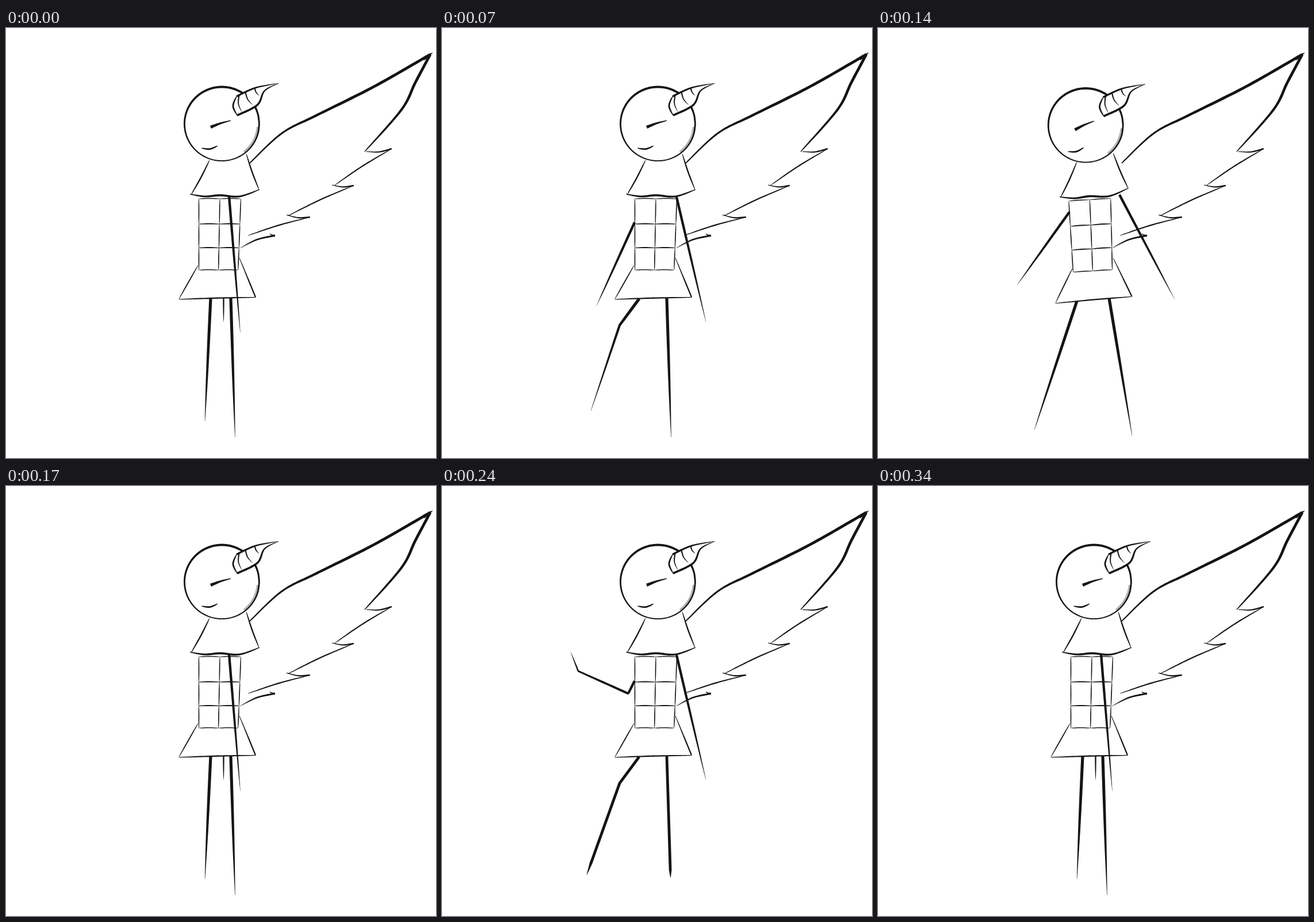
These frames come from a looping animation (748 by 748 pixels, 370 ms). An HTML page with a canvas:

```html
<!DOCTYPE html>
<html lang="en">
<head>
<meta charset="utf-8">
<title>Winged stick figure</title>
<style>
html, body { margin: 0; width: 100%; height: 100%; overflow: hidden; background: #fff; }
canvas { display: block; width: 748px; height: 748px; }
</style>
</head>
<body>
<canvas id="stage" width="748" height="748"></canvas>
<script>
const ctx = document.getElementById('stage').getContext('2d');
const INK = '#141414';
const TAU = 2 * Math.PI;

// Pen pressure along a stroke, u from 0 to 1.
const both = u => 0.25 + 0.75 * Math.sin(Math.PI * u) ** 0.7;
const tail = u => 1.08 - u ** 2.4;
const blunt = u => Math.min(1, 0.15 + 14 * (1 - u));
const grow = u => 0.4 + 0.6 * Math.min(1, 1.6 * u);

const lerp = (a, b, t) => a + (b - a) * t;
const mix = (p, q, t) => p.map((v, i) => lerp(v, q[i], t));
const spline = (a, b, c, d, t) => 0.5 * (2 * b + (c - a) * t +
  (2 * a - 5 * b + 4 * c - d) * t * t + (3 * b - a - 3 * c + d) * t * t * t);

// Point at u on a smooth curve or a polyline through points.
function along(points, u, smooth = true) {
  const n = points.length - 1;
  const i = Math.min(n - 1, Math.floor(u * n));
  const t = u * n - i;
  if (!smooth) return mix(points[i], points[i + 1], t);
  const at = k => points[Math.max(0, Math.min(n, k))];
  return [0, 1].map(c => spline(at(i - 1)[c], at(i)[c], at(i + 1)[c], at(i + 2)[c], t));
}

function brush(points, width, press = both, smooth = true) {
  const steps = 16 * (points.length - 1);
  const left = [], right = [];
  for (let s = 0; s <= steps; s++) {
    const u = s / steps;
    const [x, y] = along(points, u, smooth);
    const [ax, ay] = along(points, Math.max(0, u - 0.01), smooth);
    const [bx, by] = along(points, Math.min(1, u + 0.01), smooth);
    const k = width * press(u) / 2 / Math.hypot(bx - ax, by - ay);
    const nx = (ay - by) * k, ny = (bx - ax) * k;
    left.push([x + nx, y + ny]);
    right.unshift([x - nx, y - ny]);
  }
  ctx.fillStyle = INK;
  ctx.beginPath();
  for (const p of left.concat(right)) ctx.lineTo(...p);
  ctx.fill();
}

// Stroke between two points, its middle pushed sideways by bow.
function arc(p, q, bow, width, press) {
  const [dx, dy] = [q[0] - p[0], q[1] - p[1]];
  const k = bow / Math.hypot(dx, dy);
  const [mx, my] = mix(p, q, 0.5);
  brush([p, [mx - dy * k, my + dx * k], q], width, press);
}

const limb = (width, press, ...joints) => brush(joints, width, press, false);

// Draws a part turned about a pivot and shifted.
function part([cx, cy], dx, dy, degrees, draw) {
  ctx.save();
  ctx.translate(cx + dx, cy + dy);
  ctx.rotate(degrees * Math.PI / 180);
  ctx.translate(-cx, -cy);
  draw();
  ctx.restore();
}

function feather(hook, tip, end) {
  arc(hook, tip, 3, 2.4, grow);
  arc(tip, end, 2, 2.2);
}

function wing() {
  const tip = [738, 46];
  brush([[424, 235], [480, 183], [540, 152], [640, 102], tip], 4.8, grow);
  limb(5, tail, [726, 54], [742, 43]);
  brush([tip, [712, 95], [688, 142], [624, 215]], 4.8, u => 1 - 0.75 * u ** 4);
  feather([627, 215], [671, 210], [571, 274]);
  feather([567, 273], [605, 274], [490, 327]);
  feather([488, 325], [529, 329], [421, 361]);
  arc([459, 358], [468, 361], 1, 2.4, grow);
  arc([468, 361], [407, 383], 4, 2.8, tail);
}

const HEAD = [375.5, 166.8];

function head() {
  const [x, y] = HEAD;
  ctx.strokeStyle = 'rgba(100,100,100,.5)';
  ctx.lineWidth = 3.5;
  ctx.beginPath();
  ctx.arc(x - 1, y - 1, 63.5, 0.1, 0.9);
  ctx.stroke();
  const ring = Array.from({ length: 25 }, (_, i) =>
    [x + 65 * Math.cos(i * TAU / 24), y + 64.3 * Math.sin(i * TAU / 24)]);
  brush(ring, 3.2, u => 0.9 - 0.3 * Math.sin(TAU * u));
}

function face() {
  arc([356, 172.5], [391, 161], -1, 5.5, u => 1 - 0.8 * u);
  arc([340, 209], [368, 205], 3.5, 2.8);
}

function horn() {
  const tip = [475, 96];
  const top = [[401, 119], [434, 104], tip];
  const low = [[402, 152], [437, 134], [450, 109], tip];
  ctx.fillStyle = '#fff';
  ctx.beginPath();
  for (let u = 0; u <= 1; u += 0.05) ctx.lineTo(...along(top, u));
  for (let u = 1; u >= 0; u -= 0.05) ctx.lineTo(...along(low, u));
  ctx.fill();
  arc(top[0], low[0], 6.5, 2.8);
  brush(top, 3, tail);
  brush(low, 3.4, tail);
  for (const u of [0.1, 0.27, 0.48]) {
    const p = along(top, u);
    arc(p, mix(p, along(low, u), 1 - 0.6 * u), 4 - 5 * u, 2, tail);
  }
}

function cape() {
  arc([354, 230], [322, 290], -1, 2.4);
  arc([418, 219], [440, 281], 1, 2.4);
  brush([[320, 289], [346, 293], [372, 291], [406, 293], [441, 281]], 3.6);
}

// Grid of two columns and three rows, narrowing downwards.
function torso() {
  const rows = [295, 341, 382.5, 421];
  const at = (col, row) => [335.5 + col * (36.5 - 0.8 * row), rows[row] + (row ? 0 : 2)];
  for (let row = 0; row < 4; row++) {
    for (let col = 0; col < 3; col++) {
      if (col < 2) arc(at(col, row), at(col + 1, row), -0.5, row % 3 ? 2 : 1.6);
      if (row < 3) arc(at(col, row), at(col, row + 1), 0, 1.7);
    }
  }
}

function skirt() {
  arc([334, 413], [301, 471], 0, 1.9);
  arc([406, 400], [434, 468], 0, 2.2, grow);
  arc([300, 472], [435, 468.5], -0.5, 2.3);
}

function body(lean) {
  const headX = -14.2 * lean, headY = 2.5 * lean, turn = -3.5 * lean;
  part(HEAD, headX, headY, 0, head);
  part(HEAD, headX, headY, -6 * lean, face);
  part(HEAD, -9.5 * lean, 1.5 * lean, 0, horn);
  part([383, 255.5], -6.5 * lean, lean, turn, cape);
  part([371, 357.5], 0, 1.8 * lean, turn, torso);
  part([369, 438.5], 5.8 * lean, 2.8 * lean, turn, skirt);
}

const ARM = 4, LEG = 4.8;
const plantedLeg = (y, press) => limb(LEG, press, [391, 470], [lerp(391, 398.5, (y - 470) / 242), y]);
const bentLeg = (foot, press) => limb(LEG, press, [343, 471], [309, 517], foot);

function stand() {
  body(0);
  limb(ARM, tail, [388, 292], [407.5, 530]);
  limb(2.2, tail, [378.5, 470], [378.5, 512]);
  limb(LEG, tail, [356, 470], [346, 684]);
  plantedLeg(712, tail);
}

function step() {
  body(0);
  limb(ARM, tail, [335, 338], [269, 483]);
  limb(ARM, tail, [408, 294], [459, 511]);
  bentLeg([259, 666], tail);
  plantedLeg(712, tail);
}

function wave() {
  body(0);
  limb(ARM, tail, [335, 339], [324, 361], [237, 322], [224, 289]);
  limb(ARM, tail, [408, 294], [459, 511]);
  bentLeg([252, 676], blunt);
  plantedLeg(681, blunt);
}

function stride() {
  body(1);
  limb(ARM, tail, [333, 320], [242, 447]);
  limb(ARM, tail, [420, 290], [516, 472]);
  limb(LEG, tail, [346, 475], [272, 699]);
  limb(LEG, tail, [402, 470], [442, 709]);
}

function reach() {
  body(1);
  limb(ARM, tail, [333, 320], [318, 342], [213, 416]);
  limb(ARM, tail, [420, 290], [516, 472]);
  limb(LEG, blunt, [346, 475], [267, 709]);
  limb(LEG, blunt, [402, 470], [439, 689]);
}

// The cycle runs twice, once with plain arms and once with the raised one.
const LOOP = 370, HALF = 170;

function pose(t) {
  const raised = t >= HALF;
  const phase = t % HALF;
  if (phase < 30) return stand;
  if (phase < 100) return raised ? wave : step;
  return raised ? reach : stride;
}

const start = performance.now();

function draw(now) {
  const t = Math.max(0, now - start) % LOOP;
  ctx.fillStyle = '#fff';
  ctx.fillRect(0, 0, 748, 748);
  wing();
  pose(t)();
  requestAnimationFrame(draw);
}
draw(start);
</script>
</body>
</html>
```
